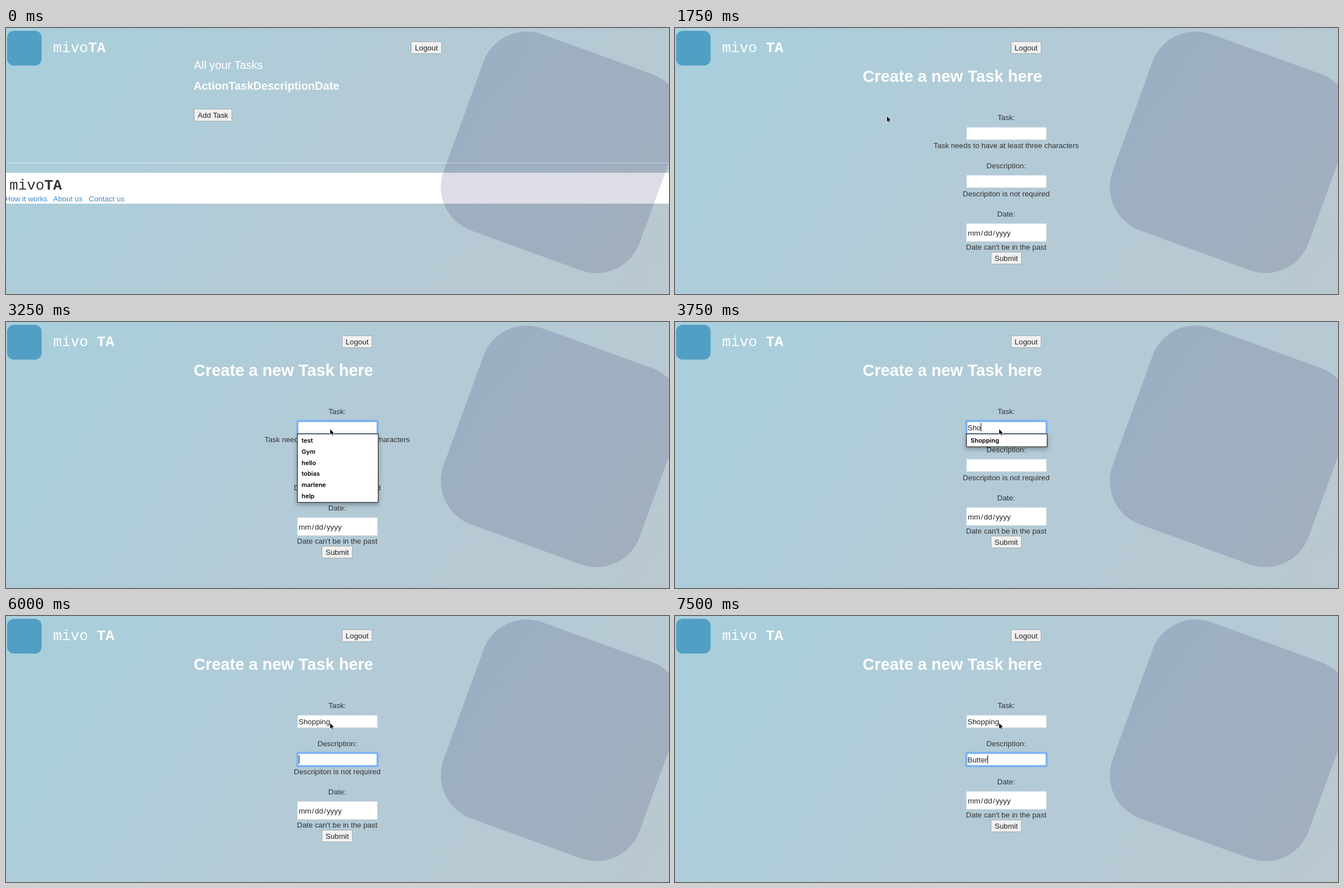
These frames come from a looping animation (1182x474 px, 8000 ms). An HTML page:

```html
<!DOCTYPE html>
<html lang="en">
<head>
<meta charset="utf-8">
<title>Task list</title>
<style>
html, body { margin: 0; width: 100%; height: 100%; overflow: hidden; }
svg { display: block; width: 1182px; height: 474px;
  background: linear-gradient(125deg, #a8cfdc, #b2cbd7 45%, #b5cad5 65%, #bac8cf);
  font: 13.33px "Liberation Sans", Arial, sans-serif; fill: #333; }
text { white-space: pre; }
.brand { font: 26px "Liberation Mono", "Courier New", monospace; }
.brand tspan { font-weight: bold; }
.white { fill: #fff; }
.h4 { font-size: 20px; }
.h1 { font-size: 29px; font-weight: bold; }
.bold { font-weight: bold; }
.mid { text-anchor: middle; }
.link { fill: #428bca; }
.btn rect { fill: #f0f0f0; stroke: #a6acae; }
.btn text { fill: #222; }
.down rect { fill: #bdbdbd; stroke: #a6a6a6; }
.field { fill: #fff; stroke: #d3dde1; }
.value { fill: #222; }
#ring { fill: none; stroke: #74aef3; stroke-width: 2.5; filter: drop-shadow(0 0 1px #74aef3); }
#menu rect { fill: #fff; stroke: #111; filter: drop-shadow(0 3px 4px rgba(0, 0, 0, .35)); }
#menu text { font: 600 11px Inter, sans-serif; fill: #000; }
</style>
</head>
<body>
<svg viewBox="0 0 1182 474">
  <rect x="2" y="5" width="61.5" height="62" rx="12" fill="#529fc5"/>

  <g id="list">
    <text class="brand white" x="84" y="43">mivo<tspan>TA</tspan></text>
    <g class="btn"><rect x="722.5" y="24.5" width="54" height="21"/><text class="mid" x="749.5" y="39.5">Logout</text></g>
    <text class="white h4" x="335" y="73">All your Tasks</text>
    <text class="white h4 bold" x="334.5" y="110">ActionTaskDescriptionDate</text>
    <g class="btn" id="add"><rect x="335.5" y="144.5" width="67" height="21.5"/><text class="mid" x="369" y="160">Add Task</text></g>
    <rect y="240" width="1182" height="1" fill="#e3edf1"/>
    <rect y="258" width="1182" height="55" fill="#fff"/>
    <text class="brand" x="6" y="288">mivo<tspan>TA</tspan></text>
    <text class="link" x="-1.5" y="309">How it works</text>
    <text class="link" x="84" y="309">About us</text>
    <text class="link" x="147.5" y="309">Contact us</text>
  </g>

  <rect x="804.5" y="35.5" width="372" height="372" rx="82" transform="rotate(20 990.5 221.5)" fill="#0a0a4b" fill-opacity=".137"/>

  <g id="form">
    <text class="brand white" x="84" y="43">mivo <tspan>TA</tspan></text>
    <g class="btn"><rect x="599.5" y="24.5" width="53" height="21"/><text class="mid" x="626" y="39.5">Logout</text></g>
    <text class="white h1" x="334.5" y="96">Create a new Task here</text>
    <text class="mid" x="590.5" y="164">Task:</text>
    <rect class="field" x="520" y="177" width="142" height="22"/>
    <text class="value" id="task" x="521.5" y="193"></text>
    <text class="mid" id="taskHint" x="590.5" y="213.5" style="font-size:13.2px">Task needs to have at least three characters</text>
    <g id="descBox">
      <text class="mid" x="590.5" y="250">Description:</text>
      <rect class="field" x="520" y="262.5" width="142" height="22"/>
      <text class="value" id="desc" x="521.5" y="278.5"></text>
      <text class="mid" id="descHint" x="590.5" y="299.5">Descripiton is not required</text>
    </g>
    <g id="dateBox">
      <text class="mid" x="590.5" y="336">Date:</text>
      <rect class="field" x="519.5" y="348.5" width="142.5" height="32"/>
      <text class="value" x="522" y="369.5">mm<tspan dx="1.3">/</tspan><tspan dx="1.3">dd</tspan><tspan dx="1.3">/</tspan><tspan dx="1.3">yyyy</tspan></text>
      <text class="mid" x="590.5" y="395">Date can't be in the past</text>
      <g class="btn"><rect x="563.5" y="399.5" width="54" height="21"/><text class="mid" x="590.5" y="415">Submit</text></g>
    </g>
    <rect id="ring" x="519.5" width="143" height="23.5" rx="1.5"/>
    <rect id="caret" width="1" height="15" fill="#000"/>
    <g id="menu"></g>
  </g>

  <path id="cursor" d="M0 0V11.5L2.6 9.2L4.3 13L6.2 12.2L4.5 8.5H8Z" fill="#000" stroke="#fff" stroke-width=".9"/>
</svg>
<script>
const LOOP = 8000, HINT = 18;
const $ = id => document.getElementById(id);
const show = (id, on) => $(id).style.display = on ? '' : 'none';
const move = (id, x, y) => $(id).setAttribute('transform', `translate(${x} ${y})`);
const history = ['test', 'Gym', 'hello', 'tobias', 'marlene', 'help'];
const match = ['Shopping'];

const start = { page: 'list', cursor: null, down: false, task: '', desc: '', focus: '', caret: false, menu: [] };

// Each step changes part of the state from its time on.
const steps = [
  [250, { cursor: [481, 100] }],
  [500, { cursor: [425, 125] }],
  [750, { cursor: [386, 147] }],
  [1000, { cursor: [376.5, 153] }],
  [1500, { cursor: [377.5, 156.5], down: true }],
  [1750, { page: 'form' }],
  [2000, { cursor: [440, 166] }],
  [2250, { cursor: [545, 184] }],
  [2500, { cursor: [574, 188], focus: 'task', caret: true }],
  [2750, { cursor: [577.5, 190] }],
  [3000, { menu: history }],
  [3250, { caret: false }],
  [3500, { task: 'Sh', caret: true, menu: match }],
  [3750, { task: 'Sho' }],
  [4000, { task: 'Shop' }],
  [4250, { task: 'Shopp' }],
  [4500, { task: 'Shoppi' }],
  [4750, { task: 'Shopping', menu: [] }],
  [5000, { focus: 'desc' }],
  [5500, { caret: false }],
  [6000, { caret: true }],
  [6500, { desc: 'B' }],
  [6750, { desc: 'But' }],
  [7000, { desc: 'Butt' }],
  [7250, { desc: 'Butte' }],
  [7500, { desc: 'Butter' }]
];

function menuMarkup(items) {
  if (!items.length) return '';
  const rows = items.map((s, i) => `<text x="527" y="${215 + i * 19.8}">${s}</text>`);
  return `<rect x="519.5" y="199.5" width="144" height="${items.length * 19.8 + 3}"/>` + rows.join('');
}

function draw(s) {
  show('list', s.page === 'list');
  show('form', s.page === 'form');
  $('add').classList.toggle('down', s.down);

  show('cursor', s.cursor);
  if (s.cursor) move('cursor', ...s.cursor);

  const taskOk = s.task.length >= 3, descOk = s.desc !== '';
  const descShift = taskOk ? -HINT : 0;
  show('taskHint', !taskOk);
  show('descHint', !descOk);
  move('descBox', 0, descShift);
  move('dateBox', 0, descShift - (descOk ? HINT : 0));
  $('task').textContent = s.task;
  $('desc').textContent = s.desc;

  show('ring', s.focus);
  show('caret', s.focus && s.caret);
  if (s.focus && s.page === 'form') {
    const top = s.focus === 'task' ? 176.5 : 262 + descShift;
    const text = s[s.focus];
    $('ring').setAttribute('y', top);
    $('caret').setAttribute('y', Math.floor(top + 4));
    $('caret').setAttribute('x', Math.round(522 + (text ? $(s.focus).getComputedTextLength() : 0) - .3));
  }
  $('menu').innerHTML = menuMarkup(s.menu);
}

let last = -1;
function tick() {
  const t = performance.now() % LOOP;
  const done = steps.filter(([at]) => at <= t);
  if (done.length !== last) {
    last = done.length;
    draw(Object.assign({}, start, ...done.map(([, change]) => change)));
  }
  requestAnimationFrame(tick);
}
tick();
</script>
</body>
</html>
```
